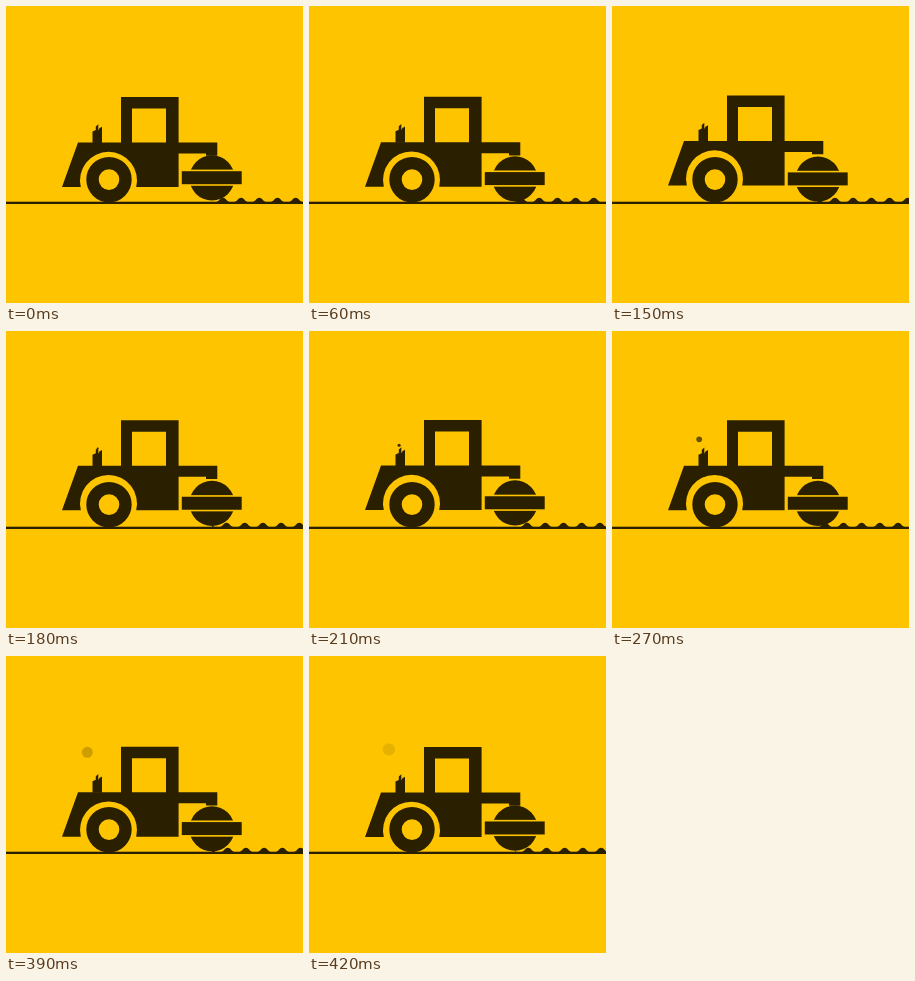
An HTML page that plays this animation: 297 by 297 pixels, repeating every 0.45 s.

```html
<!DOCTYPE html>
<html lang="en">
<head>
<meta charset="utf-8">
<title>Road roller</title>
<style>
  html, body { margin: 0; height: 100%; overflow: hidden; background: #ffc400; }
  svg { display: block; width: 100vw; height: 100vh; fill: #2a2000; }
  #scene { filter: blur(.4px); }
</style>
</head>
<body>
<svg viewBox="0 0 297 297">
  <clipPath id="ahead"><rect x="206" y="180" width="100" height="20"/></clipPath>
  <g id="scene">
    <rect x="-9" y="195.7" width="315" height="2.3"/>
    <g clip-path="url(#ahead)"><path id="bumps"/></g>
    <circle id="smoke"/>
    <g id="body">
      <path fill-rule="evenodd" d="M72 135.5H115V90H172.6V135.5H211.3V148.8H200V146.6H172.6V180H130.2A28.5 28.5 0 1 0 74.8 180H56ZM126 101.5V135.5H160V101.5Z"/>
      <path d="M86.5 136V124.6L89.8 123V119.5L92.3 117.3V123.5L93.4 121.3L96 119.8V136Z"/>
    </g>
    <g id="drum">
      <circle cx="206" cy="172.7" r="22.6"/>
      <rect x="175" y="165.2" width="61.5" height="14.6" stroke="#ffc400" stroke-width="1.6"/>
    </g>
    <circle cx="103" cy="173.6" r="16.5" fill="none" stroke="#2a2000" stroke-width="12.4"/>
  </g>
</svg>
<script>
  const LOOP = 450, STEP = 30, SPACING = 18.2;
  const [bumps, smoke, body, drum] =
    ['bumps', 'smoke', 'body', 'drum'].map(id => document.getElementById(id));

  const set = (node, attrs) => {
    for (const name in attrs) node.setAttribute(name, attrs[name]);
  };
  const move = (node, x, y) => set(node, { transform: `translate(${x} ${y})` });

  bumps.setAttribute('d', Array.from({ length: 8 }, (_, i) =>
    `M${198.7 + (i - .5) * SPACING} 196.5c5.5 0 5.5-4.8 9.1-4.8s3.6 4.8 9.1 4.8z`).join(''));

  function draw(now) {
    const t = Math.floor(now % LOOP / STEP) * STEP;
    const turn = 2 * Math.PI * t / LOOP;
    move(bumps, -(2 * SPACING * t / LOOP % SPACING), 0);
    move(body, 0, Math.cos(turn));
    move(drum, 0, -0.8 * Math.cos(2 * turn));
    set(smoke, {
      cx: 100.4 - t * 0.049,
      cy: 135.3 - t * 0.1,
      r: Math.max(0, (t - 140) * 0.022),
      opacity: t < 180 ? 0 : Math.min(1, (LOOP - t) / 260)
    });
    requestAnimationFrame(draw);
  }
  requestAnimationFrame(draw);
</script>
</body>
</html>
```
